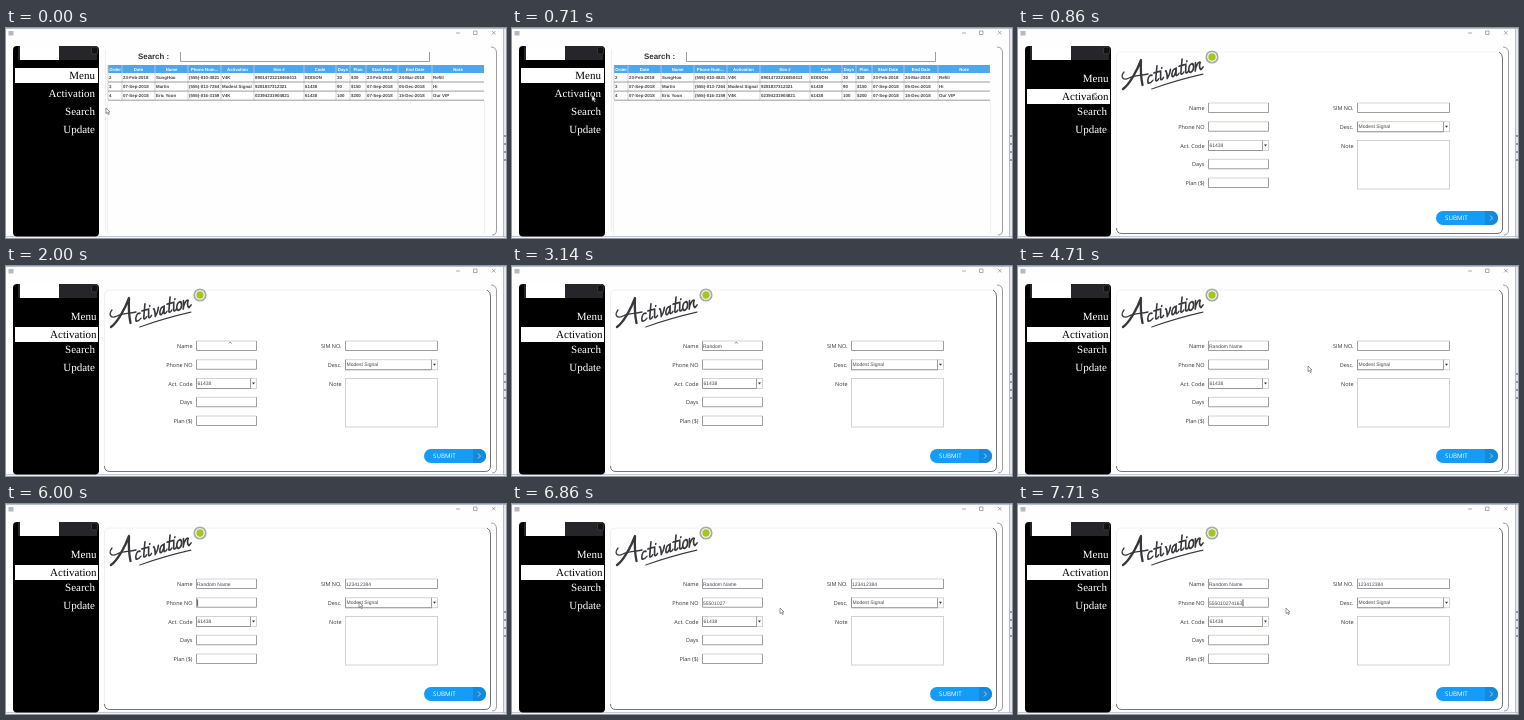
These frames come from a looping animation (500x210 px, 8000 ms). An HTML page:

```html
<!DOCTYPE html>
<html lang="en">
<head>
<meta charset="utf-8">
<title>Activation form</title>
<style>
html, body { margin: 0; width: 100%; height: 100%; overflow: hidden; background: #fff; }
svg { display: block; width: 500px; height: 210px; }
text { font-family: "Liberation Sans", Arial, sans-serif; text-rendering: geometricPrecision; white-space: pre; }
#menu text { font: 11px "Liberation Serif", serif; text-anchor: end; }
.label { font: 5.5px "Open Sans", sans-serif; fill: #333; text-anchor: end; }
.value { font-size: 5px; fill: #4a4a4a; }
.cell { font-size: 4.4px; font-weight: bold; fill: #444; }
.head { font-size: 4.3px; font-weight: bold; fill: #fff; text-anchor: middle; }
.line { fill: none; stroke: #85858c; stroke-width: .8; }
.faint { fill: none; stroke: #c8c8cc; stroke-width: .8; }
#brush { fill: none; stroke: #38383c; stroke-width: 1.7; stroke-linecap: round; stroke-linejoin: round; }
</style>
</head>
<body>
<svg viewBox="0 0 500 210">
  <!-- window frame -->
  <rect width="500" height="210" fill="#fefefe"/>
  <rect x="498" width="2" height="210" fill="#e4e8f2"/>
  <path d="M0 .5H500M497.500 0V209M0 208.700H500" stroke="#a3aec4" stroke-width=".8"/>
  <path d="M499 107v30" stroke="#8994b0" stroke-width="2" stroke-dasharray="2 6"/>
  <rect x="2.500" y="3" width="5" height="4.500" fill="#b5b8c8"/>
  <path d="M450 5h4M467.500 3h3.500v3.500h-3.500zM486 3l3.500 3.500m0-3.500l-3.500 3.500" fill="none" stroke="#777" stroke-width=".6"/>
  <path class="line" d="M485 19Q490.500 19 490.500 25V202Q490.500 207 486 207"/>

  <!-- sidebar -->
  <rect x="7" y="18" width="86" height="190.500" rx="4"/>
  <rect x="12" y="18" width="79" height="14" fill="#26262a"/>
  <rect x="14" y="18" width="39" height="14" fill="#fff"/>
  <rect x="85.500" y="19" width="6" height="7" rx="1.500" fill="#111" stroke="#444" stroke-width=".7"/>
  <g id="menu"></g>

  <g id="list">
    <text x="132" y="31" font-size="7.900" font-weight="bold" fill="#333">Search :</text>
    <path class="line" d="M174.500 24V33.500H423.500V24"/>
    <path d="M99.500 22V203M101.500 73V206M478.500 73V206" stroke="#eee"/>
  </g>

  <g id="form">
    <rect x="98.500" y="24" width="386" height="181.500" rx="5" fill="#fff" stroke="#eee" stroke-width=".8"/>
    <path class="line" d="M98.500 200Q98.500 205.500 104 205.500H479Q484.500 205.500 484.500 200V30Q484.500 26 481 24" style="stroke:#555"/>
    <g id="brush">
      <path d="M105 61C111 57 119 43 123 32C122.500 42 123 50 124.500 57" stroke-width="2.300"/>
      <path d="M106 44C102 49 105 53 111 50C117 47 122 48 130 46" stroke-width="1.300"/>
      <g id="script" transform="translate(129 56) rotate(-15) skewX(-16)">
        <path d="M5 6Q32 4 58 5" stroke-width="1.100"/>
      </g>
    </g>
    <circle cx="194" cy="29" r="5.700" fill="#fff" stroke="#aaa" stroke-width="1.800"/>
    <circle cx="194" cy="29" r="3.700" fill="#a5c71c"/>
    <rect x="418" y="183" width="62" height="14" rx="7" fill="#149cf6"/>
    <path d="M467 183h6a7 7 0 0 1 0 14h-6z" fill="#128bdf"/>
    <path d="M472 187.500l2.500 2.500l-2.500 2.500" fill="none" stroke="#d8ecfb" stroke-width=".7"/>
    <text x="427" y="192.300" fill="#fff" style="font:6.200px 'Open Sans',sans-serif">SUBMIT</text>
  </g>

  <path id="caret" d="M0-5.200V1.800" stroke="#333" stroke-width=".8"/>
  <path id="arrow" d="M0 0V5.600L1.300 4.400L2.400 6.600L3.300 6.200L2.400 4H4Z" fill="#fff" stroke="#555" stroke-width=".6"/>
  <path id="beam" d="M0 2.500L1.200 1L2.800 2.500" fill="none" stroke="#555" stroke-width=".7"/>
</svg>
<script>
const $ = id => document.getElementById(id);
const menu = $('menu'), list = $('list'), form = $('form');

function add(parent, tag, attrs, text = '') {
  const el = document.createElementNS('http://www.w3.org/2000/svg', tag);
  for (const key in attrs) el.setAttribute(key, attrs[key]);
  el.textContent = text;
  return parent.appendChild(el);
}
const write = (parent, cls, x, y, text) => add(parent, 'text', { class: cls, x, y }, text);
const show = (el, on) => el.setAttribute('visibility', on ? 'visible' : 'hidden');
const place = (el, x, y) => el.setAttribute('transform', `translate(${x} ${y})`);
const clamp = (v, max) => Math.max(0, Math.min(max, v));

// Sidebar: the rows above the highlight's lower edge sit lower on the form page
const highlight = add(menu, 'rect', { x: 9, width: 83, height: 15, fill: '#fff' });
const items = ['Menu', 'Activation', 'Search', 'Update'].map(name => add(menu, 'text', {}, name));
function setMenu(active) {
  highlight.setAttribute('y', 40 + 21 * active);
  items.forEach((item, i) => {
    const shift = active && i < 2;
    item.setAttribute('x', shift ? 90.5 : 89);
    item.setAttribute('y', 51 + 18 * i + (shift ? 3 : 0));
    item.setAttribute('fill', i === active ? '#000' : '#fff');
  });
}

// Customer table: each column is "heading:width"
const columns = 'Order:14|Date:33|Name:33|Phone Num...:33|Activation:33|Sim #:50|Code:32|Days:14|Plan:16|Start Date:32|End Date:34|Note:52';
const rows = [
  '2|23-Feb-2018|SungHoo|(555)-010-4821|V4K|89014723218450413|EDISON|30|$30|23-Feb-2018|24-Mar-2018|Refill',
  '3|07-Sep-2018|Martin|(555)-013-7264|Modest Signal|9281837312321|61438|90|$150|07-Sep-2018|05-Dec-2018|Hi',
  '4|07-Sep-2018|Eric Yoon|(555)-016-3159|V4K|02394231904821|61438|100|$200|07-Sep-2018|15-Dec-2018|Our VIP'
].map(row => row.split('|'));
const LEFT = 102, ROW = 9.1;
add(list, 'rect', { x: LEFT, y: 37, width: 376, height: 8, fill: '#4ba7ee' });
let x = LEFT;
columns.split('|').forEach((column, i) => {
  const [head, width] = column.split(':');
  write(list, 'head', x + width / 2, 42.6, head);
  rows.forEach((row, r) => write(list, 'cell', x + 1, 51 + r * ROW, row[i]));
  add(list, 'path', { class: 'faint', d: `M${x} 37V72` });
  x += +width;
});
rows.forEach((row, r) => add(list, 'path', { class: 'line', d: `M${LEFT} ${54 + r * ROW}H${x}` }));

// Script lettering: advance width and stroke of each letter
const glyphs = {
  c: [7, 'M5-7C2-9 0-4 1-1C2 0 4 0 6-2'],
  t: [6, 'M3-15L2-2C2 0 4 0 5-2M0-9H7'],
  i: [5, 'M1-8V-2C1 0 3 0 4-2M2-12v.5'],
  v: [7, 'M1-8C2-8 3-3 3 0C5-3 6-6 6-8'],
  a: [8, 'M5-7C2-9 0-4 1-1C2 1 5-2 5-8V-2C5 0 7 0 8-2'],
  o: [6, 'M2-8C-1-8-2-1 1 0C5 0 5-8 2-8'],
  n: [8, 'M0-8V0C0-4 3-9 5-7C4-5 4-1 6 0L8-2']
};
let pen = 0;
for (const letter of 'ctivation') {
  const [width, d] = glyphs[letter];
  place(add($('script'), 'path', { d }), pen, 0);
  pen += width;
}

// Form: two columns on an even row grid
const rowTop = i => 75 + 18.75 * i;
function input(x, y, w) {
  add(form, 'path', { class: 'faint', d: `M${x} ${y}h${w}` });
  add(form, 'path', { class: 'line', d: `M${x} ${y}v9.500h${w}v-9.500` });
  return write(form, 'value', x + .5, y + 6.8, '');
}
function combo(x, y, w, text) {
  add(form, 'rect', { class: 'faint', x, y, width: w, height: 10 });
  add(form, 'path', { class: 'line', d: `M${x} ${y}v10h${w - 6}v-10` });
  add(form, 'path', { d: `M${x + w - 4.5} ${y + 4}h3l-1.500 2z`, fill: '#333' });
  write(form, 'value', x + 1, y + 6.6, text);
}
function area(x, y, w) {
  add(form, 'rect', { class: 'faint', x, y, width: w, height: 48.5 });
}
function column(x, w, fields) {
  return fields.map(([label, build, text], i) => {
    write(form, 'label', x - 4, rowTop(i) + 7, label);
    return build(x, rowTop(i), w, text);
  });
}
const [nameText, phoneText] = column(190.5, 60, [['Name', input], ['Phone NO', input],
  ['Act. Code', combo, '61438'], ['Days', input], ['Plan ($)', input]]);
const [simText] = column(339.5, 92, [['SIM NO.', input], ['Desc.', combo, 'Modest Signal'], ['Note', area]]);

// Each field gains focus at a step, then receives bursts of typing at a rate in letters per step
const entries = [
  { el: nameText, focus: 11, bursts: [{ text: 'Random', at: 18, rate: 1.2 }, { text: ' Name', at: 27, rate: 1 }] },
  { el: simText, focus: 35, bursts: [{ text: '123412384', at: 38, rate: 3 }] },
  { el: phoneText, focus: 42, bursts: [{ text: '555010274163', at: 45, rate: 2 }] }
];
function type({ el, bursts }, step) {
  el.textContent = bursts.map(({ text, at, rate }) =>
    text.slice(0, clamp(Math.floor((step - at + 1) * rate + 1e-6), text.length))).join('');
}

// The caret blinks on from focus, and off from the latest key
function drawCaret(step) {
  const entry = entries.filter(e => e.focus <= step).pop();
  let on = false;
  if (entry) {
    const burst = entry.bursts.filter(b => b.at <= step).pop();
    const lastKey = burst && burst.at + Math.ceil(burst.text.length / burst.rate) - 1;
    const age = step - (burst ? Math.min(step, lastKey) : entry.focus);
    on = (age % 7 < 3) === !burst;
    const { el } = entry;
    place($('caret'), +el.getAttribute('x') + el.getComputedTextLength() + .6, el.getAttribute('y'));
  }
  show($('caret'), on);
}

// Pointer moves: first step, last step, destination
const moves = [[0, 6, 76, 65], [6, 7, 203, 66], [8, 12, 223, 75], [32, 33, 290, 100], [33, 35, 353, 98], [44, 47, 268, 104]];
function pointer(step) {
  return moves.reduce(([px, py], [from, to, mx, my]) => {
    const k = clamp((step - from) / (to - from), 1);
    return [px + (mx - px) * k, py + (my - py) * k];
  }, [100, 80]);
}

const LOOP = 8000, RATE = 7, STEPS = LOOP * RATE / 1000;
function draw(time) {
  const step = Math.floor((time % LOOP + 5) * RATE / 1000) % STEPS;
  const onForm = step >= 6;
  show(list, !onForm);
  show(form, onForm);
  setMenu(+onForm);
  entries.forEach(entry => type(entry, step));
  drawCaret(step);

  const beam = step >= 12 && step < 33;
  show($('beam'), beam);
  show($('arrow'), !beam);
  place($(beam ? 'beam' : 'arrow'), ...pointer(step));
}

const start = performance.now();
function tick() {
  draw(performance.now() - start);
  requestAnimationFrame(tick);
}
tick();
</script>
</body>
</html>
```
